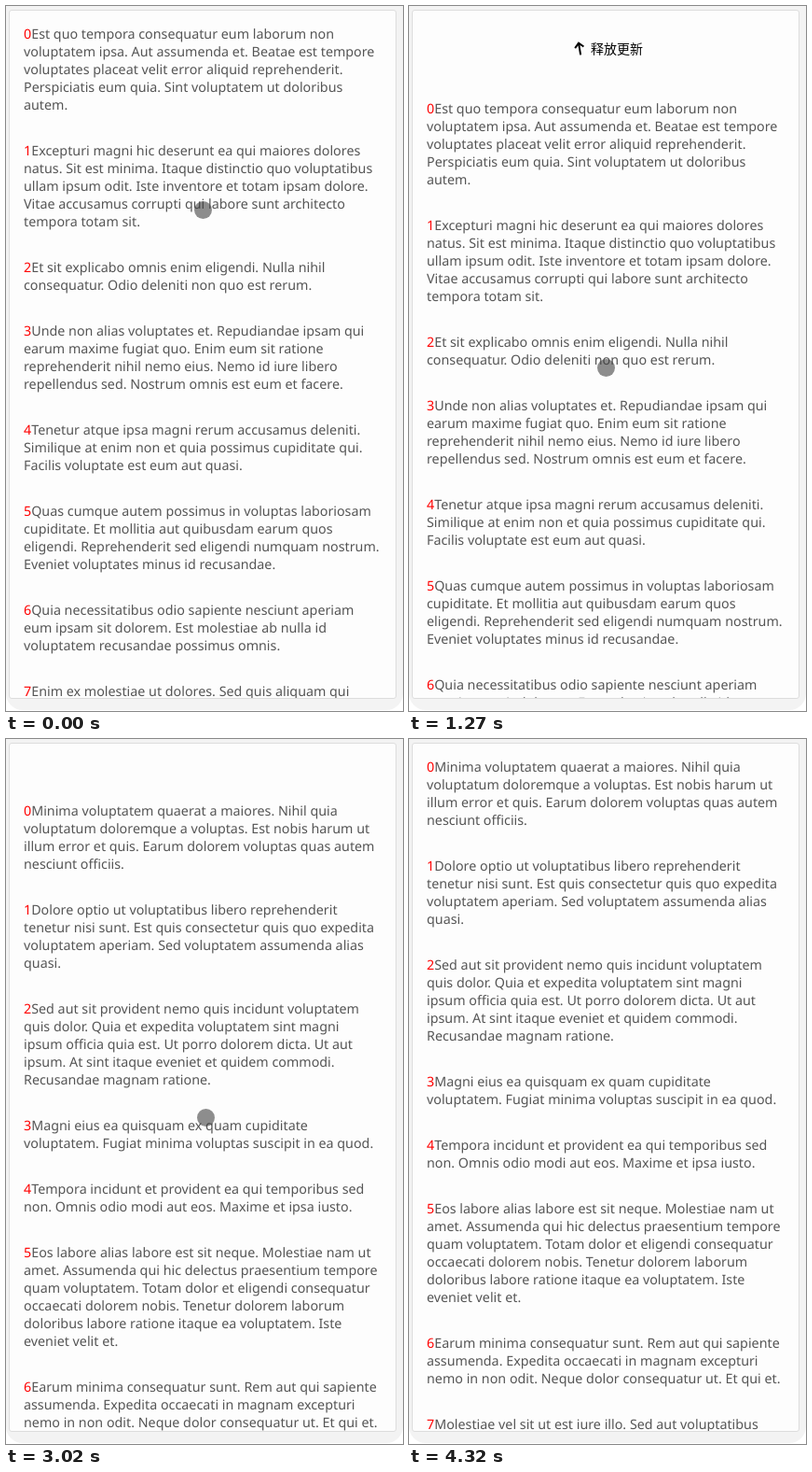
An HTML page for the animation above (5520 ms loop, 426 by 755 pixels).

```html
<!DOCTYPE html>
<html lang="en">
<head>
<meta charset="utf-8">
<title>Pull to refresh</title>
<style>
  html, body { margin: 0; width: 100%; height: 100%; overflow: hidden; background: #fff; }
  #stage { position: relative; width: 426px; height: 755px; overflow: hidden; }
  #panel { position: absolute; inset: 0 0 1px; background: #f3f3f3; border-radius: 0 0 18px 18px; }
  #card {
    position: absolute; left: 3px; top: 4px; width: 414px; height: 736px;
    border: 1px solid #ddd; border-radius: 3px; background: #fdfdfd; overflow: hidden;
  }
  .list {
    position: absolute; left: 15px; top: 16px; color: #555;
    font: 14.3px/19px "Noto Sans", "Open Sans", sans-serif;
    text-rendering: geometricPrecision; white-space: pre;
  }
  .list p { margin: 0 0 30px; }
  .list b { font-weight: 400; color: #f00; }
  #header { position: absolute; left: -4px; top: -5px; width: 426px; height: 120px; }
  #header text { font: 14px "Noto Sans CJK SC", "Noto Sans CJK", sans-serif; fill: #000; }
  #header path { fill: none; stroke: #000; stroke-width: 2; }
  #pointer {
    position: absolute; left: -9.5px; top: -9.5px; width: 19px; height: 19px;
    border-radius: 50%; background: rgba(60, 60, 60, .58);
  }
</style>
</head>
<body>
<div id="stage">
  <div id="panel"></div>
  <div id="card">
    <div class="list" id="before"></div>
    <div class="list" id="after"></div>
    <svg id="header">
      <g id="row">
        <g id="pull">
          <path id="arrow" d="M0 7V-6M-4.7 -1.2L0 -6L4.7 -1.2"/>
          <text id="hint" x="195" y="5"></text>
        </g>
        <g id="loading">
          <path id="spinner"/>
          <text x="201" y="5">加载中...</text>
        </g>
      </g>
    </svg>
  </div>
  <div id="pointer"></div>
</div>
<script>
const $ = id => document.getElementById(id);

const BEFORE = `Est quo tempora consequatur eum laborum non
voluptatem ipsa. Aut assumenda et. Beatae est tempore
voluptates placeat velit error aliquid reprehenderit.
Perspiciatis eum quia. Sint voluptatem ut doloribus
autem.

Excepturi magni hic deserunt ea qui maiores dolores
natus. Sit est minima. Itaque distinctio quo voluptatibus
ullam ipsum odit. Iste inventore et totam ipsam dolore.
Vitae accusamus corrupti qui labore sunt architecto
tempora totam sit.

Et sit explicabo omnis enim eligendi. Nulla nihil
consequatur. Odio deleniti non quo est rerum.

Unde non alias voluptates et. Repudiandae ipsam qui
earum maxime fugiat quo. Enim eum sit ratione
reprehenderit nihil nemo eius. Nemo id iure libero
repellendus sed. Nostrum omnis est eum et facere.

Tenetur atque ipsa magni rerum accusamus deleniti.
Similique at enim non et quia possimus cupiditate qui.
Facilis voluptate est eum aut quasi.

Quas cumque autem possimus in voluptas laboriosam
cupiditate. Et mollitia aut quibusdam earum quos
eligendi. Reprehenderit sed eligendi numquam nostrum.
Eveniet voluptates minus id recusandae.

Quia necessitatibus odio sapiente nesciunt aperiam
eum ipsam sit dolorem. Est molestiae ab nulla id
voluptatem recusandae possimus omnis.

Enim ex molestiae ut dolores. Sed quis aliquam qui`;

const AFTER = `Minima voluptatem quaerat a maiores. Nihil quia
voluptatum doloremque a voluptas. Est nobis harum ut
illum error et quis. Earum dolorem voluptas quas autem
nesciunt officiis.

Dolore optio ut voluptatibus libero reprehenderit
tenetur nisi sunt. Est quis consectetur quis quo expedita
voluptatem aperiam. Sed voluptatem assumenda alias
quasi.

Sed aut sit provident nemo quis incidunt voluptatem
quis dolor. Quia et expedita voluptatem sint magni
ipsum officia quia est. Ut porro dolorem dicta. Ut aut
ipsum. At sint itaque eveniet et quidem commodi.
Recusandae magnam ratione.

Magni eius ea quisquam ex quam cupiditate
voluptatem. Fugiat minima voluptas suscipit in ea quod.

Tempora incidunt et provident ea qui temporibus sed
non. Omnis odio modi aut eos. Maxime et ipsa iusto.

Eos labore alias labore est sit neque. Molestiae nam ut
amet. Assumenda qui hic delectus praesentium tempore
quam voluptatem. Totam dolor et eligendi consequatur
occaecati dolorem nobis. Tenetur dolorem laborum
doloribus labore ratione itaque ea voluptatem. Iste
eveniet velit et.

Earum minima consequatur sunt. Rem aut qui sapiente
assumenda. Expedita occaecati in magnam excepturi
nemo in non odit. Neque dolor consequatur ut. Et qui et.

Molestiae vel sit ut est iure illo. Sed aut voluptatibus`;

const fillList = (id, text) => {
  $(id).innerHTML = text.split("\n\n").map((p, i) => `<p><b>${i}</b>${p}</p>`).join("");
};
fillList("before", BEFORE);
fillList("after", AFTER);

$("spinner").setAttribute("d", Array.from({ length: 8 }, (_, i) => {
  const c = Math.cos(i * Math.PI / 4), s = Math.sin(i * Math.PI / 4);
  return `M${5 * c} ${5 * s}L${9.5 * c} ${9.5 * s}`;
}).join(""));

const LOOP = 5520, TURN = 1160, RELEASE = 2140, LOADED = 3000, SETTLE = 300;

// Rows: time, then values; straight between rows.
const PULL = [[600, 0], [680, 7], [900, 38], [1150, 70], [1210, 75], [1270, 80], [1400, 91], [1550, 98]];
const POINTER = [
  [70, 211, 218], [130, 213, 211], [200, 208.5, 206.5], [600, 208.5, 208],
  [680, 204, 248], [900, 206, 331], [1150, 210, 373], [1270, 211, 387], [1550, 214, 405],
  [3880, 214, 405], [4020, 240, 470], [4180, 300, 630], [4320, 345, 767]
];

const clamp = x => Math.min(1, Math.max(0, x));

function sample(rows, t) {
  const next = rows.findIndex(row => row[0] > t);
  if (next === 0) return rows[0].slice(1);
  if (next < 0) return rows[rows.length - 1].slice(1);
  const a = rows[next - 1], b = rows[next], k = (t - a[0]) / (b[0] - a[0]);
  return a.slice(1).map((v, i) => v + (b[i + 1] - v) * k);
}

// The CSS "ease" curve.
function ease(x) {
  x = clamp(x);
  const curve = (s, p, q) => 3 * s * (1 - s) ** 2 * p + 3 * s * s * (1 - s) * q + s ** 3;
  let low = 0, high = 1;
  for (let i = 0; i < 20; i++) {
    const mid = (low + high) / 2;
    if (curve(mid, .25, .25) < x) low = mid; else high = mid;
  }
  return curve(high, .1, 1);
}

function pullOffset(t) {
  if (t < RELEASE) return sample(PULL, t)[0];
  if (t < LOADED) return 98 - 48 * ease((t - RELEASE) / SETTLE);
  return 50 - 50 * ease((t - LOADED) / SETTLE);
}

const show = (id, on) => { $(id).style.display = on ? "" : "none"; };

function draw(t) {
  const offset = Math.round(pullOffset(t));
  for (const id of ["before", "after"]) $(id).style.transform = `translateY(${offset}px)`;
  show("before", t < LOADED);
  show("after", t >= LOADED);

  show("header", offset > 10 && t < LOADED);
  show("pull", t < RELEASE);
  show("loading", t >= RELEASE);
  $("row").setAttribute("transform", `translate(0 ${Math.round(offset / 2 + 6)})`);
  $("hint").textContent = t < TURN ? "下拉更新" : "释放更新";
  const angle = 180 + 180 * ease((t - TURN) / 155);
  $("arrow").setAttribute("transform", `translate(183 -0.5) rotate(${angle})`);
  $("spinner").setAttribute("transform", `translate(185 -1) rotate(${(t - 2430) * .36})`);

  const [x, y] = sample(POINTER, t);
  $("pointer").style.transform = `translate(${x}px, ${y}px)`;
}

const start = performance.now();
function tick() {
  draw((performance.now() - start) % LOOP);
  requestAnimationFrame(tick);
}
tick();
</script>
</body>
</html>
```
